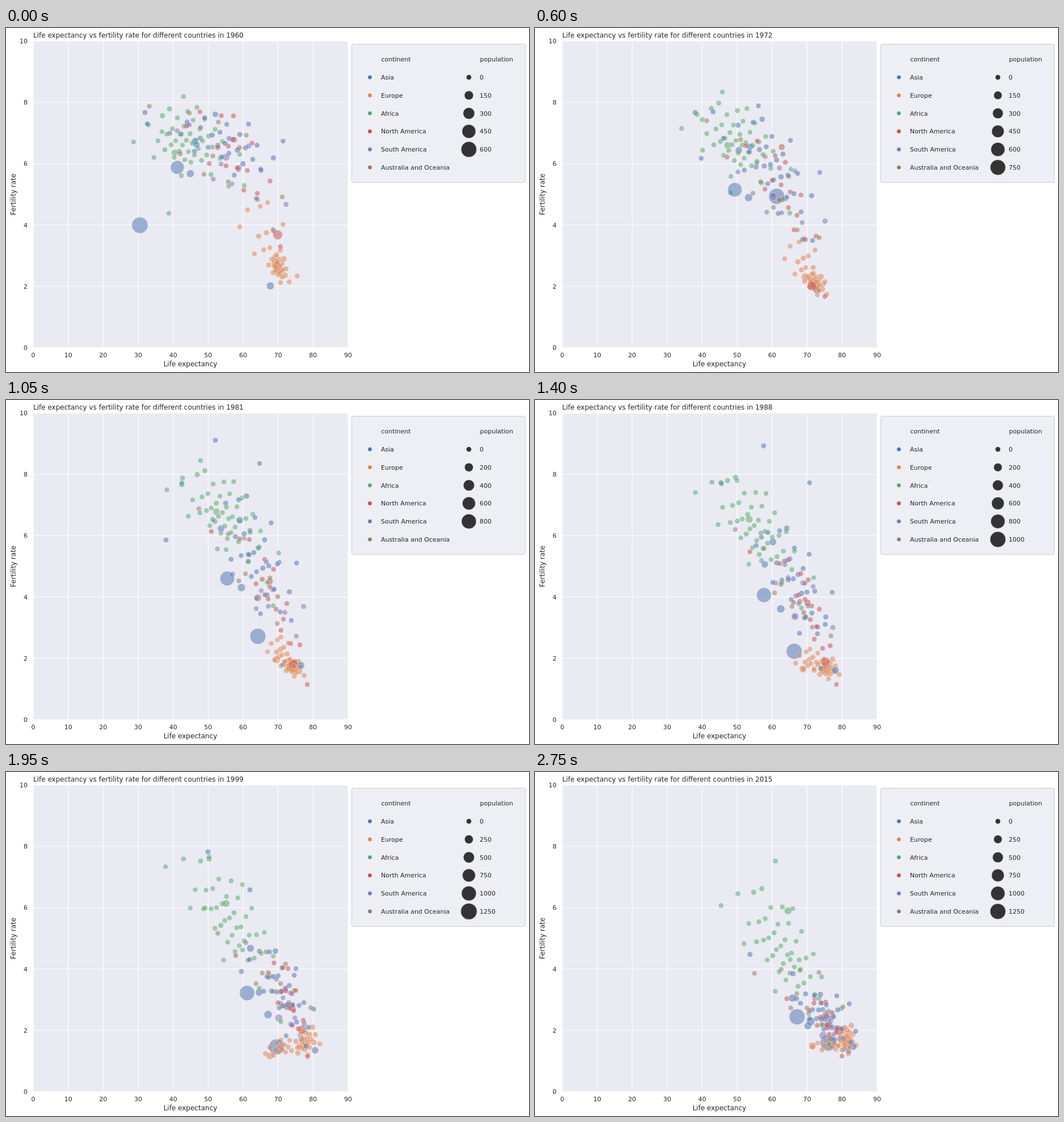
Recreate the animation shown at these times as an HTML page. Size 922 by 607 pixels, loop 2.8 s.

```html
<!DOCTYPE html>
<html lang="en">
<head>
<meta charset="utf-8">
<title>Life expectancy vs fertility rate</title>
<style>
html, body { margin: 0; width: 100%; height: 100%; overflow: hidden; background: #fff; }
svg { display: block; width: 922px; height: 607px; font: 11px "DejaVu Sans", sans-serif; fill: #262626; }
.big { font-size: 12px; }
.mid { text-anchor: middle; }
.end { text-anchor: end; }
</style>
</head>
<body>
<svg id="stage" viewBox="0 0 922 607"></svg>
<script>
const FIRST = 1960, YEARS = 56, STEP = 50;
const LEFT = 48, TOP = 23, WIDTH = 555, HEIGHT = 541;
const stage = document.getElementById('stage');

function add(tag, attrs, text) {
  const el = document.createElementNS('http://www.w3.org/2000/svg', tag);
  for (const k in attrs) el.setAttribute(k, attrs[k]);
  if (text !== undefined) el.textContent = text;
  stage.appendChild(el);
  return el;
}
const label = (x, y, text, cls = '') => add('text', { x, y, class: cls }, text);

// ---- axes ----
add('rect', { x: LEFT, y: TOP, width: WIDTH, height: HEIGHT, fill: '#eaeaf2' });
for (let i = 0; i <= 9; i++) {
  const x = LEFT + i * WIDTH / 9;
  add('path', { d: `M${x} ${TOP}v${HEIGHT}`, stroke: '#fff' });
  label(x, 581, i * 10, 'mid');
}
for (let i = 0; i <= 5; i++) {
  const y = TOP + HEIGHT - i * HEIGHT / 5;
  add('path', { d: `M${LEFT} ${y}h${WIDTH}`, stroke: '#fff' });
  label(38, y + 4, i * 2, 'end');
}
label(325, 597, 'Life expectancy', 'mid big');
label(0, 0, 'Fertility rate', 'mid big').setAttribute('transform', 'translate(17 293.5) rotate(-90)');
const title = label(LEFT, 17, '', 'big');

// ---- legend ----
const COLORS = {
  'Asia': '#4c72b0', 'Europe': '#dd8452', 'Africa': '#55a868',
  'North America': '#c44e52', 'South America': '#8172b3', 'Australia and Oceania': '#937860'
};
const [ASIA, EUROPE, AFRICA, NORTH, SOUTH, OCEANIA] = Object.keys(COLORS);
const rowY = i => 87 + i * 31.8;
add('rect', { x: 609.5, y: 28.5, width: 306, height: 244, rx: 2.5, fill: '#eeeef5', stroke: '#ccc' });
label(661.5, 59, 'continent');
label(835.5, 59, 'population');
Object.keys(COLORS).forEach((name, i) => {
  add('circle', { cx: 641.5, cy: rowY(i), r: 3.8, fill: COLORS[name], stroke: '#fff', 'stroke-width': .6 });
  label(661, rowY(i) + 4, name);
});
const sizeRows = Array.from({ length: 6 }, (_, i) => ({
  dot: add('circle', { cx: 816, cy: rowY(i), fill: '#333', stroke: '#fff', 'stroke-width': .5 }),
  text: label(835, rowY(i) + 4, '')
}));

// ---- motion ----
function mix(keys, year) {
  let i = 1;
  while (i < keys.length - 1 && keys[i][0] < year) i++;
  const a = keys[i - 1], b = keys[i];
  const t = (year - a[0]) / (b[0] - a[0]);
  return a.slice(1).map((v, k) => v + (b[k + 1] - v) * t);
}
const topPop = [[1960, 667], [1981, 994], [1999, 1253], [2015, 1376]];
const KEY_YEARS = topPop.map(k => k[0]);
const radius = share => Math.sqrt(21 + 185 * share);
const dots = [];

// Large or far-flung countries: a point per key year, plus sudden shocks.
function track(group, order, pop, path, ...shocks) {
  const keys = KEY_YEARS.map((y, i) => [y, path[2 * i], path[2 * i + 1]]).concat(shocks);
  keys.sort((a, b) => a[0] - b[0]);
  dots.push({ group, order, pop, at: year => mix(keys, year) });
}
track(ASIA, .1, [667, 1376], [236,348, 444,417, 477,485, 517,478],
  [1961, 250,386], [1962, 331,242], [1963, 368,194], [1970, 418,256], [1972, 426,297]);
track(ASIA, .4, [450, 1310], [302,246, 390,315, 425,390, 462,432]);
track(ASIA, .42, [88, 258], [325,257, 415,331, 462,428, 486,440]);
track(ASIA, .5, [93, 127], [466,455, 520,468, 545,491, 561,485]);
track(ASIA, .7, [45, 190], [336,206, 412,212, 431,311, 454,399]);
track(ASIA, .06, [48, 161], [333,200, 379,227, 446,389, 481,448]);
track(ASIA, .09, [6, 15], [309,187, 282,247, 415,352, 468,408],
  [1972, 293,230], [1977, 159,265], [1979, 205,255], [1988, 399,242]);
track(ASIA, .99, [5, 27], [249,169, 369,71, 430,208, 455,356], [1972, 314,148], [1988, 403,81]);
track(ASIA, .69, [1, 4], [323,171, 447,112, 511,347, 532,395], [1988, 484,146]);
track(ASIA, .01, [9, 33], [245,149, 310,149, 356,141, 379,322], [2007, 371,214]);
track(ASIA, .45, [2, 8], [471,356, 503,389, 525,407, 554,409]);
track(ASIA, .8, [2, 6], [449,249, 488,467, 529,484, 553,493]);
track(EUROPE, .75, [120, 144], [475,414, 477,458, 465,501, 489,483]);
track(AFRICA, .66, [45, 181], [297,220, 371,197, 388,232, 446,245]);
track(AFRICA, .76, [3, 11], [313,121, 343,107, 351,240, 467,350],
  [1988, 356,142], [1993, 270,196], [1994, 129,206], [1995, 260,214]);
track(AFRICA, .3, [1, 2], [287,327, 388,264, 417,314, 450,331]);
track(AFRICA, .65, [3, 20], [275,183, 310,146, 358,150, 424,157]);
track(AFRICA, .85, [4, 11], [420,278, 471,363, 487,413, 505,446]);
track(NORTH, .95, [187, 321], [479,365, 506,466, 522,455, 536,457], [1972, 488,455]);
track(NORTH, .58, [38, 126], [402,197, 465,320, 505,417, 516,448], [1972, 435,210]);
track(NORTH, .38, [4, 11], [307,222, 362,232, 405,324, 444,400],
  [2009, 430,376], [2010, 247,381], [2011, 432,386]);
track(SOUTH, .12, [72, 206], [388,228, 444,349, 481,434, 508,465]);

// Everyone else keeps a fixed rank inside a drifting, leaning cloud.
const fract = v => v - Math.floor(v);
const noise = n => fract(Math.abs(Math.sin(n * 12.9898) * 43758.5453));
const spread = p => Math.log(p / (1 - p)) / 1.7;
// Each pose: centre x, centre y, width, lean, height.
function cloud(group, count, pop, ...poses) {
  const keys = poses.map((p, i) => [KEY_YEARS[i], ...p]);
  for (let i = 0; i < count; i++) {
    const seed = noise(dots.length + 1);
    const u = spread((i + .2 + .6 * seed) / count);
    const v = spread(.02 + .96 * fract((i + 1) * .618 + .1 * noise(i + 9)));
    const size = pop * (.2 + 1.8 * seed ** 4);
    dots.push({
      group, order: noise(i * 7 + count), pop: [size, size * 2],
      at(year) {
        const [x, y, w, lean, h] = mix(keys, year);
        return [x + u * w, Math.min(502, y + lean * u * w + v * h)];
      }
    });
  }
}
cloud(AFRICA, 43, 7, [322, 203, 38, .15, 33], [386, 206, 40, .6, 36], [399, 268, 46, 1, 44], [438, 317, 43, .9, 46]);
cloud(ASIA, 26, 13, [392, 206, 46, .3, 28], [441, 275, 34, 1.1, 52], [488, 393, 26, 1.3, 36], [515, 440, 24, .9, 22]);
cloud(EUROPE, 24, 20, [481, 424, 8, .6, 13], [505, 472, 9, .3, 8], [528, 477, 11, -.4, 13], [550, 473, 7, -.3, 14]);
cloud(EUROPE, 14, 10, [460, 374, 25, .8, 40], [484, 445, 12, .3, 16], [484, 488, 14, -.2, 9], [520, 483, 16, 0, 7]);
cloud(NORTH, 16, 4, [403, 232, 43, .9, 45], [473, 355, 31, 2, 32], [498, 405, 18, 1.8, 34], [513, 440, 15, .9, 20]);
cloud(SOUTH, 10, 9, [396, 250, 46, .9, 42], [461, 340, 30, .8, 42], [494, 405, 15, 1.6, 18], [518, 436, 12, 1.6, 10]);
cloud(OCEANIA, 10, 2, [385, 238, 60, .9, 50], [437, 325, 44, 1.5, 32], [466, 365, 42, 1, 32], [475, 395, 40, .6, 34]);

dots.sort((a, b) => a.order - b.order);
for (const d of dots) {
  d.el = add('circle', { fill: COLORS[d.group], stroke: '#fff', 'stroke-width': .6, opacity: .5 });
}

// ---- playback ----
function draw(year) {
  const max = mix(topPop, year)[0];
  const step = max <= 900 ? 150 : max <= 1200 ? 200 : 250;
  title.textContent = 'Life expectancy vs fertility rate for different countries in ' + year;
  sizeRows.forEach(({ dot, text }, i) => {
    const used = i * step <= max;
    dot.setAttribute('r', used ? radius(i * step / max) : 0);
    text.textContent = used ? i * step : '';
  });
  for (const { el, at, pop } of dots) {
    const [x, y] = at(year);
    const people = pop[0] + (pop[1] - pop[0]) * (year - FIRST) / (YEARS - 1);
    el.setAttribute('cx', x);
    el.setAttribute('cy', y);
    el.setAttribute('r', radius(Math.min(1, people / max)));
  }
}
let shown = -1;
const start = performance.now();
function tick() {
  const year = FIRST + Math.floor((performance.now() - start) / STEP) % YEARS;
  if (year !== shown) draw(shown = year);
  requestAnimationFrame(tick);
}
tick();
</script>
</body>
</html>
```
